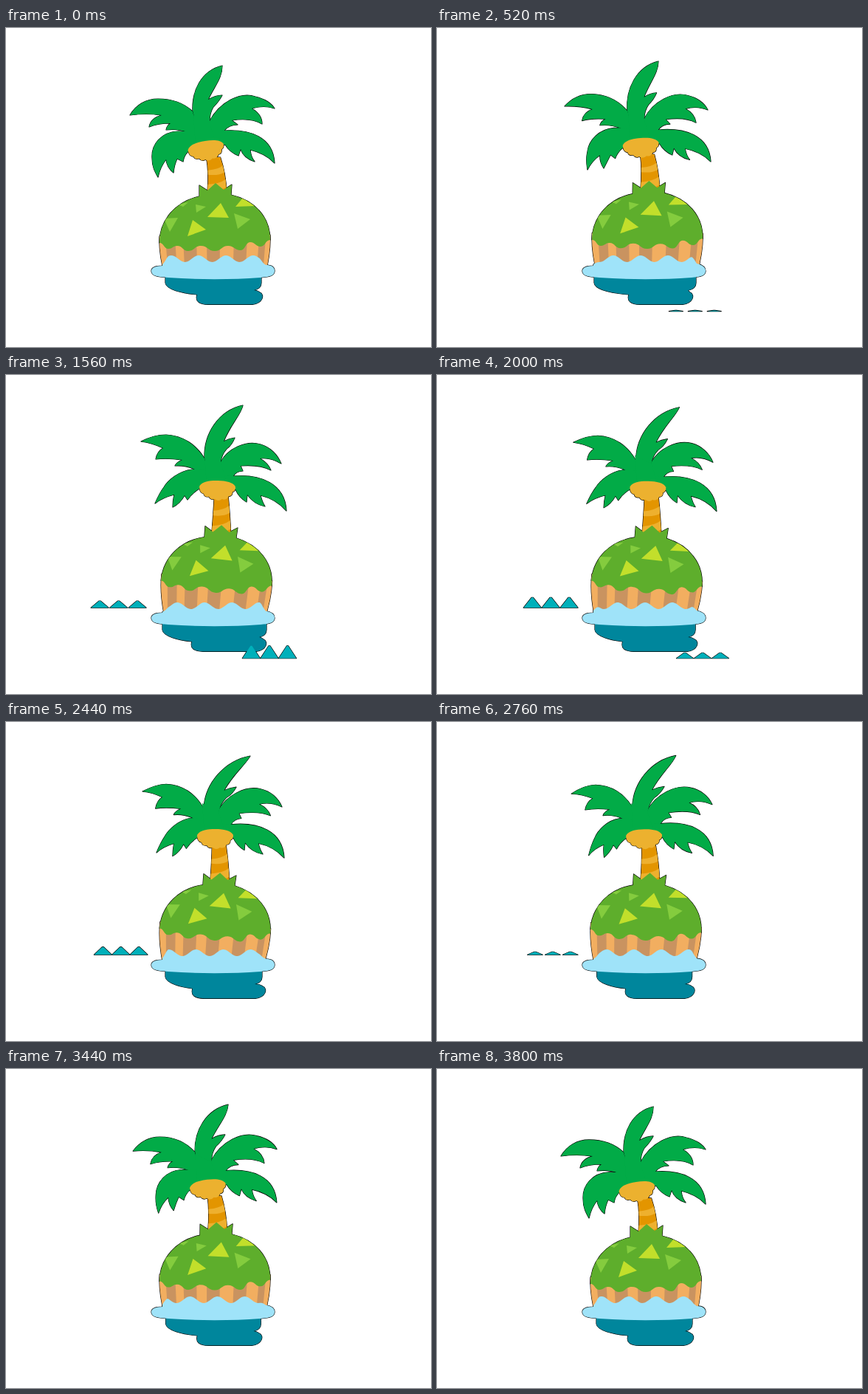
These frames come from a looping animation (576 px wide and 432 px high, 3840 ms). An HTML page:

```html
<!DOCTYPE html>
<html lang="en">
<head>
<meta charset="utf-8">
<title>Palm island</title>
<style>
html, body { margin: 0; width: 100%; height: 100%; overflow: hidden; background: #fff; }
svg { display: block; width: 576px; height: 432px; }
#edges { fill: #000; stroke: #000; stroke-width: 1.2; stroke-linejoin: round; }
</style>
</head>
<body>
<svg viewBox="0 0 576 432" xmlns="http://www.w3.org/2000/svg">
  <defs><clipPath id="domeClip"><path id="domeShape"/></clipPath></defs>
  <g id="edges"></g>
  <g id="fills"></g>
</svg>
<script>
const NS = 'http://www.w3.org/2000/svg';
const LOOP = 3840;
const KEYS = [0, 520, 920, 1560, 2440, 3080];
const $ = id => document.getElementById(id);
const lerp = (a, b, m) => a + (b - a) * m;

function add(parent, tag, attrs = {}) {
  const el = document.createElementNS(NS, tag);
  for (const k in attrs) el.setAttribute(k, attrs[k]);
  return parent.appendChild(el);
}

// A coloured shape with its dark outline on the layer below.
function part(fill) {
  const top = add($('fills'), 'path', { fill });
  const back = add($('edges'), 'path');
  return (d, tf = '') => [top, back].forEach(p => {
    p.setAttribute('d', d);
    p.setAttribute('transform', tf);
  });
}

// Smooth periodic curve through one value per key time; rests at the loop point.
function curve(v, t) {
  const n = KEYS.length;
  const at = i => v[(i + n) % n];
  const time = i => KEYS[(i + n) % n] + LOOP * Math.floor(i / n);
  const slope = i => i % n === 0 ? 0 : (at(i + 1) - at(i - 1)) / (time(i + 1) - time(i - 1));
  let i = n - 1;
  while (KEYS[i] > t) i--;
  const h = time(i + 1) - time(i), s = (t - time(i)) / h, s2 = s * s, s3 = s2 * s;
  return (2 * s3 - 3 * s2 + 1) * at(i) + (s3 - 2 * s2 + s) * h * slope(i)
    + (3 * s2 - 2 * s3) * at(i + 1) + (s3 - s2) * h * slope(i + 1);
}

const CROWN = { x: [271, 276, 281, 286, 283, 277], y: [166, 162, 157, 156, 158, 159] };
const GREEN = '#02ab47';

// Each leaf: rest pose, fully swayed pose, and the path of its tip.
const LEAVES = [
  { a: 'M262,150 L253,112 C252,86 264,58 293,51 C293,68 283,78 274,97 Q284,91 293,91 Q289,99 281,107 Q276,115 276,126 L282,150 Z',
    b: 'M277,140 L269,112 C268,80 288,48 321,41 C318,54 305,66 295,90 Q302,86 310,85 Q306,95 299,100 Q292,108 291,118 L297,140 Z',
    x: [293, 300, 306, 321, 331, 313], y: [51, 45, 39, 41, 46, 45] },
  { a: 'M262,150 L253,113 C240,101 225,96 206,96 C190,96 176,104 168,118 Q190,115 211,118 Q196,122 194,134 Q206,129 223,129 Q218,132 217,138 Q232,136 246,141 Z',
    b: 'M277,140 L269,113 C258,95 240,82 217,81 C205,81 195,84 183,90 Q198,92 213,99 Q205,103 203,114 Q218,112 239,115 Q231,118 229,123 Q242,122 254,127 Z',
    x: [168, 173, 178, 183, 185, 178], y: [118, 106, 93, 90, 94, 102] },
  { a: 'M262,140 Q245,140 233,140 C210,141 197,158 198,176 C198,188 202,195 206,202 Q209,188 217,178 Q218,189 227,196 Q228,185 232,177 L240,181 Q241,173 247,167 L270,165 Z',
    b: 'M277,130 Q262,127 252,128 C235,130 220,142 214,152 C208,160 205,167 202,174 Q212,166 228,162 Q226,170 226,179 Q236,174 242,163 L246,169 Q252,160 262,154 L280,155 Z',
    x: [206, 204, 201, 202, 204, 207], y: [202, 192, 181, 174, 177, 186] },
  { a: 'M275,145 L276,126 C290,100 318,86 338,93 C350,96 360,102 364,109 Q350,104 333,109 Q347,117 347,130 Q332,121 306,125 L314,131 Q302,131 296,139 L275,150 Z',
    b: 'M291,140 L291,118 C300,100 325,88 345,94 C358,98 368,108 373,120 Q358,111 344,113 Q355,119 359,129 Q344,121 318,123 L321,130 Q312,130 308,137 L290,145 Z',
    x: [364, 367, 370, 373, 374, 371], y: [109, 111, 117, 120, 115, 109] },
  { a: 'M275,140 L296,139 C330,137 362,147 364,183 Q352,170 331,165 Q332,175 337,181 Q322,176 318,164 L315,173 Q303,168 297,158 L275,160 Z',
    b: 'M291,135 L308,137 C345,134 378,147 380,184 Q366,168 345,163 Q347,172 351,178 Q336,175 327,162 L326,172 Q316,166 311,155 L290,155 Z',
    x: [364, 371, 380, 380, 377, 371], y: [183, 181, 182, 184, 184, 179] }
];

const numbers = d => d.match(/\d+/g).map(Number);

function leafPath(leaf, t, m) {
  const drift = (k, axis) => curve(k[axis], t) - lerp(k[axis][0], k[axis][3], m);
  const root = [drift(CROWN, 'x'), drift(CROWN, 'y')];
  const tip = [drift(leaf, 'x'), drift(leaf, 'y')];
  const p = leaf.pa, q = leaf.pb;
  const reach = Math.hypot(leaf.x[0] - 271, leaf.y[0] - 150);
  let i = -2;
  return leaf.a.replace(/\d+,\d+/g, () => {
    i += 2;
    const w = Math.min(1, Math.hypot(p[i] - 271, p[i + 1] - 150) / reach) ** 2;
    return [0, 1].map(k =>
      (lerp(p[i + k], q[i + k], m) + lerp(root[k], tip[k], w)).toFixed(2)).join();
  });
}

// Wavy line through alternating crests and dips.
function wavy(pts) {
  let [x0, y0] = pts[0], d = '';
  for (const [x, y] of pts.slice(1)) {
    const mx = (x0 + x) / 2;
    d += ` C${mx},${y0} ${mx},${y} ${x},${y}`;
    x0 = x; y0 = y;
  }
  return d;
}

const HEM = [[208, 291], [220, 299], [232, 295], [247, 302], [264, 295], [283, 302],
  [301, 295], [318, 301], [331, 290], [345, 296], [358, 287]];
const GRASS = 'M208,291' + wavy(HEM) +
  ' C358,255 336,233 305,226 L306,212 L295,219 L284,210 L273,220 L262,213 L262,228 C230,235 208,260 208,291 Z';
const BASKET = 'M208,282 Q207,305 215,335 L351,335 Q359,305 358,280 Z';
const STRIPES = [[216, 229], [240, 258], [272, 290], [309, 327], [343, 352]];
const SPOTS = {
  '#c2df2b': 'M291,237 L273,256 L302,257 Z M253,260 L246,282 L271,273 Z M321,230 L311,242 L337,241 Z',
  '#84cc3e': 'M257,239 L271,242 L258,250 Z M214,258 L233,257 L222,276 Z M309,251 L331,259 L314,272 Z M233,239 L247,236 L240,242 Z'
};
const COCONUTS = 'M-24,-5 C-20,-12 -10,-13 1,-13 C12,-13 22,-11 25,-5 Q25,1 21,2 Q21,8 16,8 Q13,14 7,12 Q2,16 -3,12 Q-8,14 -11,9 Q-17,10 -18,5 Q-24,4 -24,-5 Z';

const reflection = part('#00869c');
const basket = part('#f2ae60');
const stripes = add($('fills'), 'path', {
  fill: '#c99360',
  d: STRIPES.map(([l, r]) => {
    const low = x => 283 + (x - 283) * 0.94;
    return `M${l},284 L${r},284 L${low(r)},335 L${low(l)},335 Z`;
  }).join('')
});
const trunk = part('#e39500');
const bands = add($('fills'), 'path', { fill: '#eeb02e' });
const grass = part('#5eae2c');
$('domeShape').setAttribute('d', GRASS);
const spots = add($('fills'), 'g', { 'clip-path': 'url(#domeClip)' });
for (const fill in SPOTS) add(spots, 'path', { fill, d: SPOTS[fill] });
for (const leaf of LEAVES) {
  leaf.pa = numbers(leaf.a);
  leaf.pb = numbers(leaf.b);
  leaf.set = part(GREEN);
}
// Closes the gaps where the leaves meet.
const hub = add($('fills'), 'path', { fill: GREEN, d: 'M-17,-48 L5,-37 L14,-8 L-14,-6 Z' });
const coconuts = part('#ecb12f');
const foam = part('#9fe3f9');
const ripples = [part('#00b0ba'), part('#00b0ba')];

function foamPath(t) {
  let d = 'M212,322';
  for (let x = 212; x <= 352; x += 2) {
    const env = Math.min(1, (x - 210) / 9, (354 - x) / 9);
    const y = 322 - env * (9.5 + 4.5 * Math.cos(2 * Math.PI * ((x - 224) / 37 - 3 * t / LOOP)));
    d += ` L${x},${y.toFixed(2)}`;
  }
  return d + ' C360,321 364,324 364,329 C364,336 356,337 345,338 C305,341 260,341 220,338 C206,337 197,336 197,329 C197,325 202,322 212,322 Z';
}

function reflectionPath(t) {
  const l = curve([216, 213, 211, 212, 216, 217], t);
  const r = curve([346, 351, 353, 353, 347, 345], t);
  const a = curve([258, 259, 256, 251, 252, 258], t);
  const b = curve([348, 347, 349, 353, 352, 347], t);
  return `M${l},336 V345 C${l + 1},354 ${l + 22},359 ${a + 1},361 C${a - 2},370 ${a + 4},374 ${a + 16},374.3`
    + ` L${b - 14},374.3 C${b},373 ${b + 3},361 ${b - 4},358 Q${b - 8},355 ${r - 10},355`
    + ` Q${r},353 ${r},345 V336 Z`;
}

// Three little waves that swell and sink while drifting right.
function ripplePath(t, start, x, y, speed, height) {
  const age = (t - start) / 1760;
  if (age <= 0 || age >= 1) return '';
  const h = height * Math.sin(Math.PI * age);
  const hw = 9 + 3 * Math.min(1, h / 9);
  const gap = 26 - 2.3 * age;
  let d = '';
  for (let i = 0; i < 3; i++) {
    const c = x + speed * (t - start) / 1000 + i * gap;
    d += `M${c - hw},${y} L${c - 1},${y - h} H${c + 1} L${c + hw},${y} Z`;
  }
  return d;
}

function drawTrunk(top, base) {
  const ctrl = [base[0] + 0.5, lerp(top[1], base[1], 0.45)];
  const pt = (s, side) => {
    const q = k => (1 - s) ** 2 * top[k] + 2 * s * (1 - s) * ctrl[k] + s * s * base[k];
    return `${(q(0) + side * lerp(9.5, 13, s)).toFixed(2)},${q(1).toFixed(2)}`;
  };
  const steps = [0, 0.25, 0.5, 0.75, 1];
  trunk('M' + steps.map(s => pt(s, -1)).concat(steps.reverse().map(s => pt(s, 1))).join(' L') + 'Z');
  bands.setAttribute('d', [[0.34, 0.5], [0.74, 0.92]].map(([u, v]) =>
    `M${pt(u + 0.06, -1)} Q${pt(u + 0.04, 0.3)} ${pt(u - 0.08, 1)} L${pt(v - 0.04, 1)} Q${pt(v + 0.06, 0.3)} ${pt(v + 0.03, -1)} Z`).join(''));
}

function draw(t) {
  const cx = curve(CROWN.x, t), cy = curve(CROWN.y, t);
  const tilt = curve([0, 1, 2.4, 4.3, 4.3, 2.1], t);
  const dx = curve([0, 2, 3, 2, 0, 0], t);
  const dy = curve([0, -3, -6.3, -7, -6, -5.5], t);
  const dome = `translate(${dx} ${dy}) rotate(${tilt} 283 292)`;
  basket(BASKET, dome);
  grass(GRASS, dome);
  stripes.setAttribute('transform', dome);
  spots.setAttribute('transform', dome);

  const a = tilt * Math.PI / 180;
  drawTrunk([cx + 10 - tilt, cy + 9],
    [286 + dx + 50 * Math.sin(a), 292 + dy - 70 * Math.cos(a)]);
  const sway = curve([0, 0.4, 1, 1, 1, 0.6], t);
  for (const leaf of LEAVES) leaf.set(leafPath(leaf, t, sway));
  hub.setAttribute('transform', `translate(${cx} ${cy})`);
  const turn = curve([-10, -5, 0, 1, 0, -4], t);
  coconuts(COCONUTS, `translate(${cx} ${cy}) rotate(${turn})`);

  foam(foamPath(t));
  reflection(reflectionPath(t));
  ripples[0](ripplePath(t, 480, 323.5, 383.7, 8.2, 18));
  ripples[1](ripplePath(t, 1160, 125.2, 315.2, 4.8, 14));
}

const begin = performance.now();
function tick() {
  draw((performance.now() - begin) % LOOP);
  requestAnimationFrame(tick);
}
tick();
</script>
</body>
</html>
```
